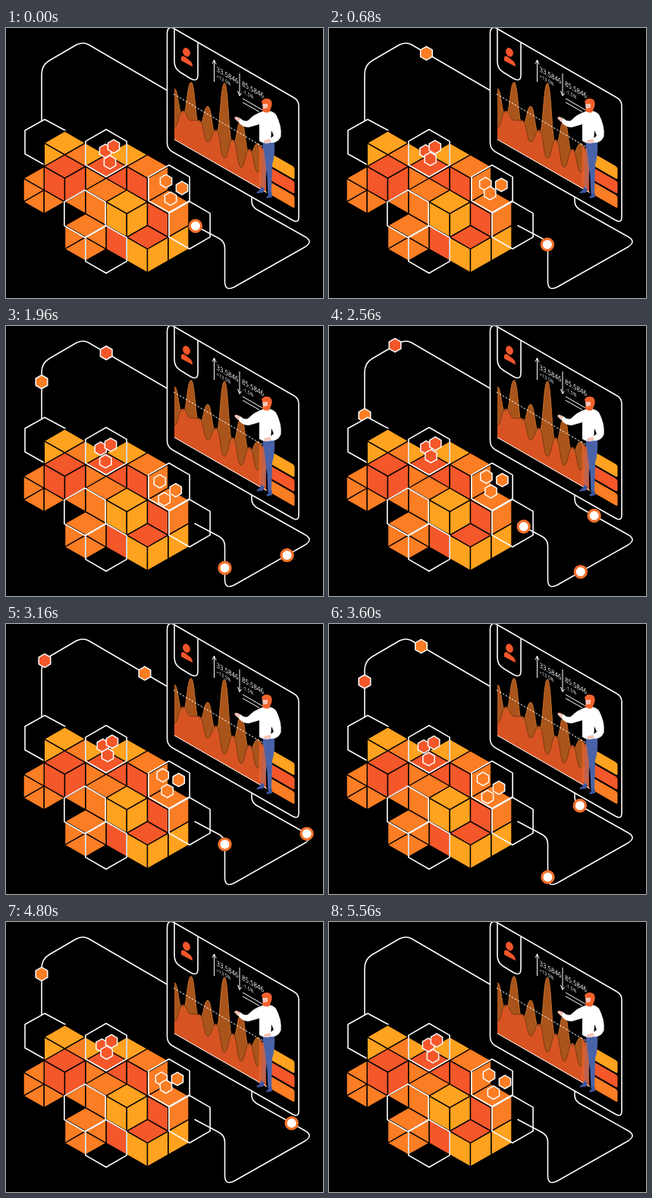
An HTML page for the animation above (5.6 s loop, 418 by 356 pixels).

```html
<!DOCTYPE html>
<html lang="en">
<head>
<meta charset="utf-8">
<title>Isometric data flow</title>
<style>
html, body { margin: 0; width: 100%; height: 100%; overflow: hidden; background: #000; }
svg { display: block; }
text { font-family: "Open Sans", "Noto Sans", sans-serif; fill: #fff; }
.line { fill: none; stroke: #fff; stroke-width: 1.6; stroke-linejoin: round; stroke-linecap: round; }
.thin { fill: none; stroke: #fff; stroke-width: 1; }
.mark { stroke: #fff; stroke-width: 1.5; stroke-linejoin: round; }
.face { stroke: #000; stroke-width: 1.4; stroke-linejoin: round; }
</style>
</head>
<body>
<svg width="418" height="356" viewBox="0 0 418 356">
  <path id="upper" class="line" d="M227 90.700 L109 22 Q102 18 93 22 L57 43 Q47 49 47 61 V140"/>
  <path id="lower" class="line" d="M249 260.500 L281 277.500 Q288.500 281.500 288.500 290 V334 Q288.500 348 301 341.500 L392 290 Q407 282 394 275 L330 239 Q324 235 324 228 V200"/>
  <g id="tokens"></g>
  <path d="M78 135 L51 120.500 L25 135 V166 L51 181 L78 166 Z"/>
  <path class="line" d="M78 135 L51 120.500 L25 135 V166 L50 180"/>
  <g id="cubes"></g>
  <g id="frames"></g>
  <g id="small"></g>
  <g id="rings"></g>

  <g id="panel">
    <path class="line" style="fill:#000" d="M212.500 8 Q212.500 -4 222 1 L379 91.500 Q386 95 386 103 V249 Q386 258 378 253.500 L219 163 Q212.500 159 212.500 151 Z"/>
    <path class="line" d="M222 2 V44 Q222 54 230 58.500 L243 66.500 Q253 72 253 62 V20"/>
    <g fill="#f4552a">
      <ellipse cx="238" cy="32" rx="4.600" ry="6.200" transform="rotate(-25 238 32)"/>
      <path d="M231 40 Q231 35 236 38 L241 42 Q246 45 246 51 L231 43 Z"/>
    </g>
    <path class="thin" d="M274.500 71 V43 M272 47 L274.500 42 L277 48 M308 60 V89 M305.500 83 L308 89.500 L310.500 86 M312 93 L338 108 M312 98 L334 110.500"/>
    <g id="labels"></g>
    <g id="chart"></g>
    <path class="thin" stroke-dasharray="2.6 2" d="M221 87 L346 161"/>
    <g id="bars"></g>

    <g id="man">
      <path fill="#4a63a8" d="M339 150 L354 150 Q355 168 351 180 L350 218 L345.500 219 L344 187 L341 212 L336 212 L337 178 Z"/>
      <path fill="#e9622c" opacity=".75" d="M334 155 L340 160 L343 186 L341 212 L333 207 Z"/>
      <path fill="#3d56a0" d="M336 211 L341 212 L339 217 L331 218 Q329 216 333 215 Z M345.500 217 L350.500 217 L351 223 L344 224.500 Q342 222 346 221 Z"/>
      <path fill="#fff" d="M338 110 Q349 107 356 114 Q364 129 362.500 143 Q358 153 348 151 L347 147 L353 142 L350 135 L349 151 Q341 154 334 149 L334 127 L320 131 Q311 131 306 123 L309 119 Q314 124 319 122 Q328 113 338 110 Z"/>
      <path fill="#f6c3b5" d="M309 119 L306 124 L302 120 Q300 117 304 117 Z M348 146 L350 150 L343 152 Q338 151 341 148 Z M338 99 L349 100 L347 111 L339 110 Z"/>
      <path fill="#f4622b" d="M337 97 Q340 91 348 94 Q352 97 350 104 L347 111 Q340 113 337 107 L345 105 L345 100 L338 100 Z"/>
    </g>
  </g>
</svg>
<script>
const LOOP = 5600;
const YELLOW = '#ffa21f', ORANGE = '#fb7d24', RED = '#f4572a';
const $ = id => document.getElementById(id);

function add(parent, tag, attrs) {
  const el = document.createElementNS('http://www.w3.org/2000/svg', tag);
  for (const k in attrs) el.setAttribute(k, attrs[k]);
  return $(parent).appendChild(el);
}

function hexPath(x, y, r) {
  const pts = [];
  for (let k = 0; k < 6; k++) {
    const a = Math.PI * (k / 3 - 0.5);
    pts.push((x + r * Math.cos(a)).toFixed(2) + ' ' + (y + r * Math.sin(a)).toFixed(2));
  }
  return 'M' + pts.join('L') + 'Z';
}

// Isometric grid: i counts columns, j counts half edges downwards
const gridX = i => 23 + 27.25 * i;
const gridY = j => 136 + 15.55 * j;

function face(fill, ...pts) {
  const d = 'M' + pts.map(([i, j]) => gridX(i) + ' ' + gridY(j)).join('L') + 'Z';
  add('cubes', 'path', { class: 'face', fill, d });
}

// Cube whose top corner is (i, j); later faces hide earlier ones
function cube(i, j, top, left, right) {
  if (top) face(top, [i, j], [i + 1, j + 1], [i, j + 2], [i - 1, j + 1]);
  if (left) face(left, [i - 1, j + 1], [i, j + 2], [i, j + 4], [i - 1, j + 3]);
  if (right) face(right, [i, j + 2], [i + 1, j + 1], [i + 1, j + 3], [i, j + 4]);
}

// Half rhombus with its tip to the east (1) or west (-1)
const half = (i, j, dir, fill) => face(fill, [i, j], [i + dir, j + 1], [i, j + 2]);

cube(2, 0, YELLOW, YELLOW, ORANGE);
cube(4, 0, null, YELLOW, YELLOW);
cube(6, 0, null, YELLOW);
cube(4, 2, RED, ORANGE, RED);
cube(2, 2, RED, RED, RED);
cube(6, 2, ORANGE, RED, ORANGE);
cube(4, 4, ORANGE, ORANGE);
cube(5, 5, YELLOW, YELLOW, YELLOW);
cube(7, 5, ORANGE, RED, ORANGE);
cube(5, 7, null, RED);
cube(7, 7, null, null, YELLOW);
cube(6, 8, RED, YELLOW, YELLOW);
cube(3, 7, ORANGE);
half(3, 5, -1, ORANGE);
// Facets of the two open cubes on the left
for (const [i, j] of [[1, 5], [3, 9]]) {
  half(i - 1, j - 1, 1, ORANGE);
  half(i, j, -1, ORANGE);
  half(i, j, 1, ORANGE);
}
half(1, 3, -1, ORANGE);
half(4, 8, -1, ORANGE);

for (const [x, y] of [[132, 165], [215, 212], [242, 260], [104, 245], [132, 292]])
  add('frames', 'path', { class: 'line', d: hexPath(x, y, 31.3) });

function label(str, x, y, size) {
  const el = add('labels', 'text', { transform: `matrix(.866 .5 0 1 ${x} ${y})`, 'font-size': size });
  el.textContent = str;
}
label('33.5846', 277.5, 57, 9.1);
label('+13.5%', 277.5, 65.5, 6.5);
label('85.5846', 311, 76, 9.1);
label('-1.5%', 312, 85.5, 6.5);

// Wave over the slanted base: one height per 22 px, with a fixed height halfway between
function wave(heights, between) {
  const at = (x, h) => [x, 147 + 0.574 * (x - 222) - h];
  const pts = heights.flatMap((h, k) => [at(222 + 22 * k, h), at(233 + 22 * k, between)]);
  return pts.reduce((d, [x, y], k) => {
    if (!k) return `M${x} ${y}`;
    const [px, py] = pts[k - 1], m = (px + x) / 2;
    return d + `C${m} ${py} ${m} ${y} ${x} ${y}`;
  }, '');
}
const back = wave([67, 88, 69, 112, 76, 58], 38);
const front = wave([16, 38, 22, 13, 14, 20], 44);
const base = 'L343 217 L222 147 Z';
add('chart', 'path', { d: back + base, fill: '#a9541b' });
add('chart', 'path', { d: front + base, fill: '#dc5323', opacity: 0.93 });
add('chart', 'path', { d: back, fill: 'none', stroke: '#c4702c' });
add('chart', 'path', { d: front, fill: 'none', stroke: '#7d3a12' });
add('chart', 'path', { d: 'M222 147 L344 217', class: 'thin' });

[YELLOW, RED, ORANGE].forEach((fill, k) =>
  add('bars', 'path', { fill, transform: `translate(0 ${19 * k})`,
    d: 'M348.500 168 Q348.500 165 351 166.500 L378 182 Q380.500 183.500 380.500 186 V197 Q380.500 200 378 198.500 L351 183 Q348.500 181.500 348.500 179 Z' }));

function place(el, x, y) {
  el.setAttribute('transform', `translate(${x.toFixed(2)} ${y.toFixed(2)})`);
}

function ride(el, path, s, visible) {
  el.style.display = visible ? '' : 'none';
  if (!visible) return;
  const p = path.getPointAtLength(s);
  place(el, p.x, p.y);
}

// Hexagons on the upper line slow down: distance = reach * seconds ^ power
const TOKENS_END = 5460;
const tokens = [
  { start: 0, reach: 147, power: 0.66, fill: ORANGE },
  { start: 1200, reach: 131, power: 0.65, fill: RED },
  { start: 3060, reach: 168, power: 0.52, fill: ORANGE }
];
for (const k of tokens)
  k.el = add('tokens', 'path', { class: 'mark', fill: k.fill, d: hexPath(0, 0, 9) });

// Rings on the lower line speed up
const rings = [0, 920, 2420].map(start => ({
  start,
  el: add('rings', 'circle', { r: 7.6, fill: '#fff', stroke: '#f4702b', 'stroke-width': 3.2 })
}));

// Drifting hexagons: home, sideways amount, then the weights of three vertical waves
const small = [
  [131, 162, 0.75, 1, 0, -1, RED],
  [142, 156, 0.48, 1.2, 0, -0.6, RED],
  [137, 177, 0.7, 1.2, 3.3, 0, RED],
  [211, 202, 1, 4.5, 0, -2, ORANGE],
  [232, 211, 1, 4.4, 5, 0, ORANGE],
  [217, 225, 1, 1.5, 5.4, 1, ORANGE]
].map(([x, y, side, drop, bob, sway, fill]) => ({
  x, y, side, drop, bob, sway,
  el: add('small', 'path', { class: 'mark', fill, d: hexPath(0, 0, 8.8) })
}));

function draw(t) {
  for (const { el, start, reach, power } of tokens) {
    const age = t - start;
    ride(el, $('upper'), reach * Math.max(0, age / 1000) ** power, age >= 0 && t < TOKENS_END);
  }
  for (const { el, start } of rings) {
    const age = t - start;
    ride(el, $('lower'), 1 + 0.051 * age + 2.45e-5 * age * age, age >= 0);
  }
  const [w1, w2, w3] = [1, 2, 3].map(n => 1 - Math.cos(2 * Math.PI * n * t / LOOP));
  for (const s of small)
    place(s.el, s.x - s.side * (4.5 * w2 + 1.5 * w1), s.y + s.drop * w2 - s.bob * w3 + s.sway * w1);
}

const start = performance.now();
function tick() {
  draw((performance.now() - start) % LOOP);
  requestAnimationFrame(tick);
}
draw(0);
requestAnimationFrame(tick);
</script>
</body>
</html>
```
